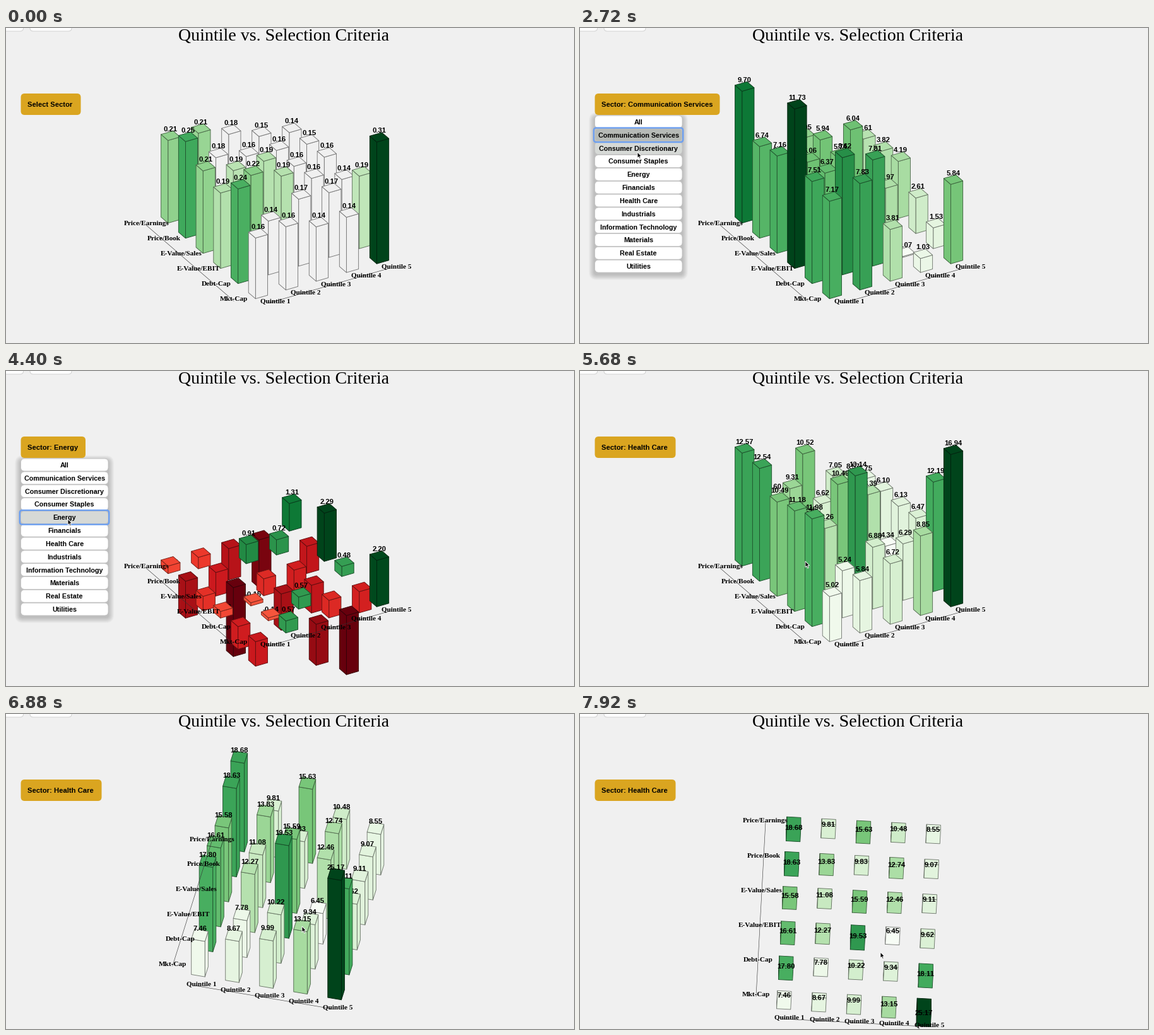
These frames come from a looping animation (900x500 px, 8000 ms). A matplotlib script:

```python
import numpy as np
import matplotlib.pyplot as plt
from matplotlib.animation import FuncAnimation
from matplotlib.collections import PolyCollection
from matplotlib.patches import FancyBboxPatch, Polygon

W, H, DPI = 900, 500, 100
FRAMES, STEP = 100, 80
BG = "#f0f0f0"
UNIT = 11.09            # pixels per value unit
CELL = 5 * UNIT         # distance between bars
CENTER = np.array([440, 346.4])
COUNT_MS = 1000

CRITERIA = ["Mkt-Cap", "Debt-Cap", "E-Value/EBIT", "E-Value/Sales",
            "Price/Book", "Price/Earnings"]
SECTORS = ["All", "Communication Services", "Consumer Discretionary",
           "Consumer Staples", "Energy", "Financials", "Health Care",
           "Industrials", "Information Technology", "Materials",
           "Real Estate", "Utilities"]

# Rows follow CRITERIA, columns are the quintiles.
ALL = np.array([
    [10.03, 10.45, 8.99, 9.13, 20.12],
    [15.65, 8.89, 11.06, 10.69, 11.98],
    [12.47, 13.93, 12.36, 10.55, 8.93],
    [13.62, 12.22, 12.33, 10.05, 10.12],
    [15.97, 11.86, 10.61, 10.17, 9.76],
    [13.66, 13.40, 11.77, 9.98, 9.18]])
COMMUNICATION = np.array([
    [7.17, 7.83, 3.81, 1.03, 5.84],
    [7.51, 8.62, 7.81, 0.07, 1.53],
    [11.73, 6.37, 3.60, 3.97, 2.61],
    [7.16, 6.06, 5.74, 3.20, 4.19],
    [6.74, 4.20, 5.94, 6.04, 3.82],
    [9.70, 3.90, 4.95, 2.40, 3.61]]) / 0.4451
ENERGY = np.array([
    [-4.05, 1.99, -6.8, -9.78, 7.67],
    [-3.75, -0.49, 1.99, -2.9, -3.5],
    [-1.1, -0.53, -6.0, -4.6, 1.67],
    [-2.4, -11.4, -2.8, -3.6, 7.98],
    [-6.1, -3.9, 3.17, 2.51, -4.5],
    [-1.25, -1.9, -5.2, -7.9, 4.56]])
HEALTH = np.array([
    [7.46, 8.67, 9.99, 13.15, 25.17],
    [17.80, 7.78, 10.22, 9.34, 18.11],
    [16.61, 12.27, 19.53, 6.45, 9.62],
    [15.58, 11.08, 15.59, 12.46, 9.11],
    [18.63, 13.83, 9.83, 12.74, 9.07],
    [18.68, 9.81, 15.63, 10.48, 8.55]])

# start in ms, button text, button width, selected menu row, values
SCENES = [
    (-157, "Select Sector", 95, None, ALL),
    (2239, "Sector: Communication Services", 198, 1, COMMUNICATION),
    (3984.5, "Sector: Energy", 102.5, 4, ENERGY),
    (5114, "Sector: Health Care", 128, 6, HEALTH)]
MENU_OPEN, MENU_CLOSE = 1600, 5440

CURSOR_START = 1360
CURSOR_T = [1360, 1600, 2160, 2300, 2720, 3500, 3900, 4400, 5000, 5200,
            5440, 5680, 6240, 6880, 7200, 7920]
CURSOR_X = [12, 70, 88, 89, 91, 95, 98, 98, 96, 98,
            190, 357, 414, 469, 472, 476]
CURSOR_Y = [0, 125, 170, 172, 197, 220, 234, 235, 273, 275,
            290, 302, 318, 337, 346, 378]
ARROW = np.array([(0, 0), (0, 9.4), (2.1, 7.5), (3.7, 11), (5.2, 10.3),
                  (3.7, 6.9), (6.6, 6.8)])

TURN_T = [6240, 6880, 7120, 7920]
TURN = [30, -13, -14.5, -3.1]
TILT = [30, 47.2, 55, 94.5]

fig = plt.figure(figsize=(W / DPI, H / DPI), dpi=DPI, facecolor=BG)
ax = fig.add_axes([0, 0, 1, 1])
ax.set_xlim(0, W)
ax.set_ylim(H, 0)
ax.axis("off")
live = []


def px(size):
    return size * 72 / DPI


def text(x, y, label, size, font="Liberation Sans", weight="bold", z=50,
         ha="center", va="baseline"):
    item = ax.text(x, y, label, fontsize=px(size), family=font, weight=weight,
                   color="black", ha=ha, va=va, zorder=z)
    live.append(item)


def box(x, y, w, h, radius, fill, edge="none", width=0, z=60, alpha=None):
    style = f"round,pad=0,rounding_size={radius}"
    item = FancyBboxPatch((x, y), w, h, boxstyle=style, facecolor=fill,
                          edgecolor=edge, linewidth=px(width), zorder=z,
                          alpha=alpha)
    live.append(ax.add_patch(item))


def ease(t):
    t = min(max(t, 0), 1)
    return 4 * t ** 3 if t < 0.5 else 1 - 4 * (1 - t) ** 3


def bar_color(value, values):
    if value < 0:
        return plt.cm.Reds(min(1.0, 0.53 + 0.055 * -value))[:3]
    if values is ALL and value < 11.9:
        return (0.941, 0.941, 0.941)
    share = (value - values.min()) / np.ptp(values)
    return plt.cm.Greens(float(share))[:3]


class View:
    def __init__(self, turn, tilt):
        self.sa, self.ca = np.sin(np.radians(turn)), np.cos(np.radians(turn))
        self.sb, self.cb = np.sin(np.radians(tilt)), np.cos(np.radians(tilt))

    def back(self, q, r):
        return r * self.ca + q * self.sa

    def project(self, q, r, height=0):
        x = (q * self.ca - r * self.sa) * CELL
        y = -self.back(q, r) * self.sb * CELL - height * UNIT * self.cb
        return CENTER + (x, y)

    def faces(self, q, r, value):
        """Sides turned to the viewer, then the top."""
        low, high = sorted((0, value))
        e = 0.2
        corners = [(q - e, r - e), (q + e, r - e), (q + e, r + e),
                   (q - e, r + e)]
        normals = [(0, -1), (1, 0), (0, 1), (-1, 0)]
        shown = []
        for k, normal in enumerate(normals):
            if -self.back(*normal) * self.cb > 0:
                a, b = corners[k], corners[(k + 1) % 4]
                shown.append([self.project(*a, low), self.project(*b, low),
                              self.project(*b, high), self.project(*a, high)])
        shown.append([self.project(*c, high) for c in corners])
        return shown


def draw_bars(view, values, progress):
    cells = [(j, i) for j in range(6) for i in range(5)]
    cells.sort(key=lambda c: -view.back(c[1], c[0]) * np.sign(view.cb))
    for k, (j, i) in enumerate(cells):
        q, r, value = i - 2, j - 2, values[j, i]
        color = bar_color(value, values)
        z = 10 + k
        bar = PolyCollection(view.faces(q, r, value), facecolors=[color],
                             edgecolors=[tuple(0.49 * c for c in color)],
                             linewidths=px(0.9), zorder=z)
        live.append(ax.add_collection(bar, autolim=False))
        x, y = view.project(q, r, value)
        # labels of negative bars lie behind the bar
        text(x, y - 7, f"{value * progress:.2f}", 11.2,
             z=z + (0.5 if value >= 0 else -0.3))


def draw_axes(view):
    for a, b in [((-2.8, -2), (-2.8, 3)), ((-2, -2.6), (2, -2.6))]:
        ends = np.array([view.project(*a), view.project(*b)])
        live.extend(ax.plot(ends[:, 0], ends[:, 1], color="#333333",
                            lw=px(0.6), zorder=48))
    for j, name in enumerate(CRITERIA):
        text(*view.project(-2.8, j - 2), name, 11.2, "Liberation Serif")
    for i in range(5):
        x, y = view.project(i - 2, -2.6)
        text(x + 10.5, y, f"Quintile {i + 1}", 11.2, "Liberation Serif")


def draw_menu(selected, mouse):
    for grow in range(9):
        box(22 - grow, 142 - grow, 141 + 2 * grow, 250 + 2 * grow, 5 + grow,
            "black", z=55, alpha=0.022)
    for k, name in enumerate(SECTORS):
        y = 149 + 20.83 * k
        hover = 23 < mouse[0] < 162 and abs(mouse[1] - y) < 10.4
        fill = "#d6d9d6" if hover else "#b6bab6" if k == selected else "white"
        if k == selected:
            box(21.8, y - 11.3, 141.4, 22.6, 4, "none", "#6c9ff0", 2.4, z=62)
        box(23.5, y - 9.9, 138.5, 19.8, 6, fill, "#c4c4c4", 0.8, z=61)
        text(92.7, y + 4, name, 10.7, z=63)


def draw_cursor(mouse):
    item = Polygon(ARROW + mouse, facecolor="black", edgecolor="white",
                   linewidth=px(0.9), zorder=80)
    live.append(ax.add_patch(item))


def draw_page():
    text(440, 20.5, "Quintile vs. Selection Criteria", 27.9,
         "Liberation Serif", "normal")
    for x, w in [(-20, 47.5), (38, 66)]:
        box(x, -20, w, 25, 5, "white", "#c8c8c8", 0.8)


def draw(frame):
    while live:
        live.pop().remove()
    now = frame * STEP
    start, caption, width, selected, values = [
        s for s in SCENES if s[0] <= now][-1]
    mouse = np.array([np.interp(now, CURSOR_T, CURSOR_X),
                      np.interp(now, CURSOR_T, CURSOR_Y)])
    view = View(np.interp(now, TURN_T, TURN), np.interp(now, TURN_T, TILT))

    draw_page()
    draw_bars(view, values, ease((now - start) / COUNT_MS))
    draw_axes(view)
    box(23.5, 104, width, 34, 6, "#daa520", z=60)
    text(34.5, 125.3, caption, 11.3, z=61, ha="left")
    if MENU_OPEN <= now < MENU_CLOSE:
        draw_menu(selected, mouse)
    if now >= CURSOR_START:
        draw_cursor(mouse)
    return live


anim = FuncAnimation(fig, draw, frames=FRAMES, interval=STEP,
                     init_func=lambda: [], repeat=True, repeat_delay=0)
plt.show()
```
